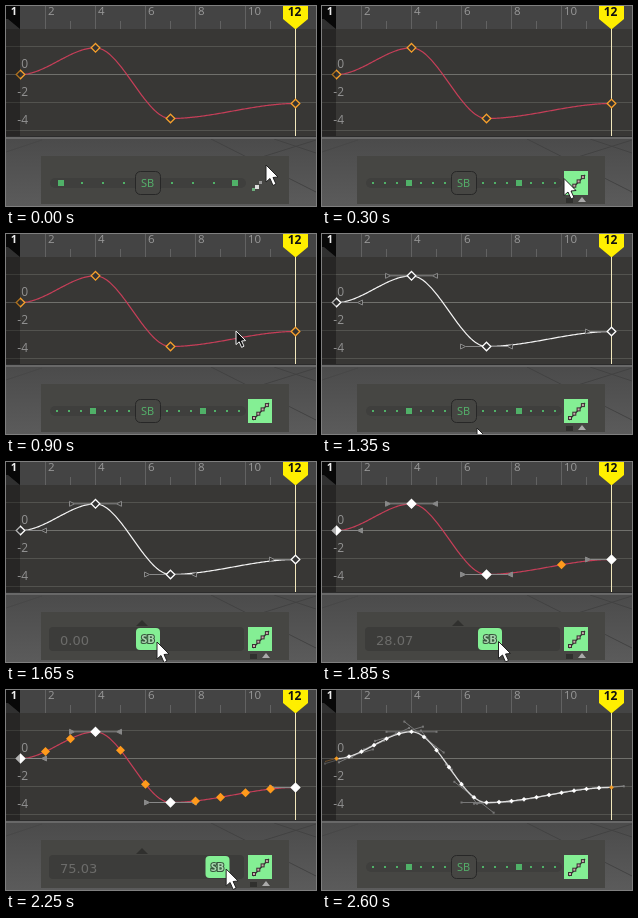
Animation of 310x200 px, one loop 3.15 s. Source, as an HTML page with a canvas:

```html
<!DOCTYPE html>
<html>
<head>
<meta charset="utf-8">
<style>
html, body { margin: 0; width: 100%; height: 100%; overflow: hidden; background: #555; }
canvas { display: block; }
</style>
</head>
<body>
<canvas id="stage" width="310" height="200"></canvas>
<script>
const c = document.getElementById('stage').getContext('2d');
const LOOP = 3150, STEP = 50;
const FONT = '"Open Sans", sans-serif', WIDE = '"DejaVu Sans", sans-serif';
const KEYS = [[1, 68.5], [4, 41.8], [7, 112.5], [12, 97.5]];
const frameX = f => 14.5 + 25 * (f - 1);

// [time, x, y] of the pointer tip
const POINTER = [[0, 260, 159], [200, 255, 174], [250, 255, 174], [550, 177, 165],
  [600, 178, 161], [900, 230, 97], [1000, 232, 102], [1050, 228, 107], [1100, 217, 121],
  [1150, 197, 165], [1200, 191, 206], [1300, 158, 206], [1350, 155, 194],
  [1500, 151, 180], [1700, 151, 180], [2000, 202, 179], [2400, 231, 179],
  [2450, 232, 182], [2600, 240, 206]];
const SLIDER = [[1700, 142], [2000, 194], [2400, 222]];

function track(points, t) {
  const i = points.findIndex(p => p[0] > t);
  if (i === 0) return points[0].slice(1);
  if (i < 0) return points[points.length - 1].slice(1);
  const a = points[i - 1], b = points[i], k = (t - a[0]) / (b[0] - a[0]);
  return a.slice(1).map((v, j) => v + (b[j + 1] - v) * k);
}

function rect(x, y, w, h, color) {
  c.fillStyle = color;
  c.fillRect(x, y, w, h);
}

function path(points, fill, stroke, width = 1, close = true) {
  c.beginPath();
  points.forEach(p => c.lineTo(p[0], p[1]));
  if (close) c.closePath();
  if (fill) { c.fillStyle = fill; c.fill(); }
  if (stroke) { c.strokeStyle = stroke; c.lineWidth = width; c.stroke(); }
}

const line = (x1, y1, x2, y2, color, width = 1) =>
  path([[x1, y1], [x2, y2]], null, color, width, false);

function round(x, y, w, h, r, fill, stroke) {
  c.beginPath();
  c.roundRect(x, y, w, h, r);
  c.fillStyle = fill;
  c.fill();
  if (stroke) { c.strokeStyle = stroke; c.lineWidth = 1; c.stroke(); }
}

function text(s, x, y, size, color, align = 'left', weight = '', font = FONT) {
  c.font = `${weight} ${size}px ${font}`;
  c.textAlign = align;
  c.fillStyle = color;
  c.fillText(s, x, y);
}

const diamond = (x, y, r, fill, stroke) =>
  path([[x, y - r], [x + r, y], [x, y + r], [x - r, y]], fill, stroke, 1.3);

// Value and slope of the curve at a frame
function curve(f) {
  const i = Math.max(1, KEYS.findIndex(k => k[0] >= f));
  const [f0, y0] = KEYS[i - 1], [f1, y1] = KEYS[i];
  const u = (f - f0) / (f1 - f0);
  return { y: y0 + (y1 - y0) * u * u * (3 - 2 * u),
    slope: (y1 - y0) * 6 * u * (1 - u) / (25 * (f1 - f0)) };
}

function drawCurve(color) {
  const points = [];
  for (let f = 1; f < 12; f += 0.05) points.push([frameX(f), curve(f).y]);
  points.push([frameX(12), KEYS[3][1]]);
  path(points, null, color, 1.2, false);
}

function inBetweens(step) {
  const list = [];
  for (let i = 0; i < 3; i++) {
    const end = KEYS[i + 1][0];
    for (let f = KEYS[i][0] + step; f < end - step / 2; f += step) list.push(f);
  }
  return list;
}

function drawGrid() {
  rect(0, 0, 310, 131, '#383735');
  rect(0, 0, 310, 23, '#444');
  for (let f = 2; f < 13; f++)
    line(frameX(f), f % 2 ? 15 : 0, frameX(f), 23, '#626262');
  for (let f = 2; f < 12; f += 2) text(f, frameX(f) + 2.5, 9, 11.5, '#999');
  for (const y of [40.5, 68.5, 96.5, 124.5])
    line(0, y, 310, y, y === 68.5 ? '#70706c' : '#53534f');
}

// Shade before the first frame, axis labels and time tags
function drawMarkers() {
  rect(0, 0, 14, 131, 'rgba(0,0,0,0.3)');
  [0, -2, -4].forEach((n, i) => text(n, 22, 62 + 28 * i, 12, '#929292', 'right'));
  path([[0, 0], [14, 0], [14, 23], [2, 13], [0, 13]], '#080808');
  text('1', 8, 9, 11, '#eee', 'center', 'bold');
  line(289.5, 20, 289.5, 131, '#f2e8bc');
  path([[277, 0], [302, 0], [302, 13], [290, 23], [289, 23], [277, 13]], '#ffef00');
  text('12', 288.5, 10, 12, '#111', 'center', 'bold');
}

function drawHandles(filled) {
  KEYS.forEach(([f, y], i) => {
    const x = frameX(f);
    for (const s of [-1, 1]) {
      if (s < 0 && i === 0 || s > 0 && i === 3) continue;
      line(x, y, x + s * 21, y, '#888');
      path([[x + s * 26, y - 2.5], [x + s * 21, y], [x + s * 26, y + 2.5]],
        filled ? '#888' : '#383735', '#888');
    }
  });
}

function drawBaked() {
  const frames = inBetweens(0.5).concat([4, 7]);
  for (const f of frames) {
    const { y, slope } = curve(f), x = frameX(f), n = Math.hypot(1, slope);
    const dx = 25 / n, dy = slope * dx;
    line(x - dx, y - dy, x + dx, y + dy, '#777');
    for (const s of [-1, 1]) rect(x + s * dx - 1, y + s * dy - 1, 2, 2, '#777');
  }
  drawCurve('#ddd');
  line(3, 71.5, 14, 68.5, '#9a7040');
  line(289.5, 97, 302, 96, '#888');
  drawMarkers();
  frames.forEach(f => diamond(frameX(f), curve(f).y, 2.3, '#fff'));
  for (const i of [0, 3]) diamond(frameX(KEYS[i][0]), KEYS[i][1], 2.3, '#f59a20');
}

function drawGraph(t, value) {
  drawGrid();
  if (t >= 2450) {
    drawBaked();
    return;
  }
  const selected = t >= 1050, dragging = t >= 1700;
  drawCurve(selected && !dragging ? '#f4f4f4' : '#c63e58');
  if (selected) drawHandles(dragging);
  if (dragging && value > 20) {
    const step = value < 45 ? 3 : value < 67 ? 1.5 : value < 78 ? 1 : 0.5;
    inBetweens(step).forEach(f => diamond(frameX(f), curve(f).y, 4.5, '#ff9a1c'));
  }
  const drawKey = ([f, y]) =>
    diamond(frameX(f), y, 4.3, dragging ? '#fff' : '#333', selected ? '#fff' : '#f7a02c');
  drawKey(KEYS[0]);
  drawMarkers();
  KEYS.slice(1).forEach(drawKey);
}

function drawViewport() {
  const g = c.createLinearGradient(0, 133, 0, 200);
  g.addColorStop(0, '#4b4b4b');
  g.addColorStop(1, '#5b5b5b');
  rect(0, 130, 310, 70, g);
  line(205, 133, 310, 186, '#424242');
  line(240, 156, 310, 134, '#424242');
  line(268, 133, 310, 147, '#424242');
  line(0, 146, 36, 134, '#474747');
  rect(0, 130, 310, 1, '#2c2c2c');
  rect(0, 131, 310, 2, '#686868');
}

function drawDots(gap, count, inner) {
  round(44, 172, 196, 10, 5, '#3f3f3d');
  for (const side of [-1, 1]) {
    for (let i = 0; i < count; i++) {
      const x = 142 + side * (inner + gap * i);
      const r = i === 3 ? 3 : 1;
      rect(x - r, 177 - r, 2 * r, 2 * r, '#50b168');
    }
  }
}

function drawKeyIcon(active) {
  if (!active) {
    rect(246, 182, 3, 3, '#6cae7c');
    rect(249, 179, 4, 4, '#ddd');
    rect(253, 175, 3, 3, '#999');
    return;
  }
  rect(242, 165, 24, 24, '#84ef94');
  line(247, 186, 263, 169, '#333', 1.2);
  for (let i = 0; i < 4; i++) {
    rect(246 + i * 4.3, 182 - i * 4.3, 4, 4, '#3a2f32');
    rect(247 + i * 4.3, 183 - i * 4.3, 2, 2, '#c9a9ad');
  }
}

function drawPanel(t, x, value) {
  rect(35, 150, 248, 48, '#464643');
  const pressed = t >= 1600 && t < 2450, active = t >= 250;
  if (t >= 350 && t < 700 || t >= 1400 && t < 2450)
    path([[130, 164], [136, 158], [142, 164]], '#30302e');
  if (pressed) {
    round(43, 165, 195, 24, 4, '#3c3c3a');
    text(value.toFixed(2), 54, 183, 13, '#6c6c6a', 'left', '', WIDE);
    round(x - 12, 166, 24, 22, 4, '#84ef94');
    c.font = `bold 11px ${FONT}`;
    c.textAlign = 'center';
    c.strokeStyle = '#37563d';
    c.lineWidth = 2;
    c.strokeText('SB', x, 181);
    text('SB', x, 181, 11, '#a9d8b0', 'center', 'bold');
  } else {
    if (active) drawDots(12, 7, 19);
    else drawDots(21, 4, 24);
    round(129.5, 165.5, 25, 23, 5, '#464643', '#272727');
    text('SB', 141.5, 181, 11, '#55b56c', 'center');
  }
  drawKeyIcon(active);
  if (t >= 300 && t < 700 || t >= 1150 && t < 2450) {
    rect(244, 192, 7, 5, '#30302e');
    path([[256, 196], [260, 191], [264, 196]], '#aaa');
  }
}

// Over the graph the pointer is small and dark
function drawPointer(t) {
  if (t >= 2600) return;
  const [x, y] = track(POINTER, t), dark = y < 130, k = dark ? 0.8 : 1;
  const shape = [[0, 0], [0, 17], [4, 13.5], [7, 20.5], [10, 19], [7, 12.5], [12, 12]];
  path(shape.map(p => [x + p[0] * k, y + p[1] * k]),
    dark ? '#111' : '#fff', dark ? '#eee' : '#222');
}

function draw(now) {
  const t = Math.floor(now % LOOP / STEP) * STEP;
  const [x] = track(SLIDER, t);
  const value = (x - 142) * 56.14 / 52;
  drawViewport();
  c.save();
  c.beginPath();
  c.rect(0, 0, 310, 130);
  c.clip();
  drawGraph(t, value);
  c.restore();
  drawPanel(t, x, value);
  drawPointer(t);
}

const start = performance.now();
function tick() {
  draw(performance.now() - start);
  requestAnimationFrame(tick);
}
tick();
</script>
</body>
</html>
```
